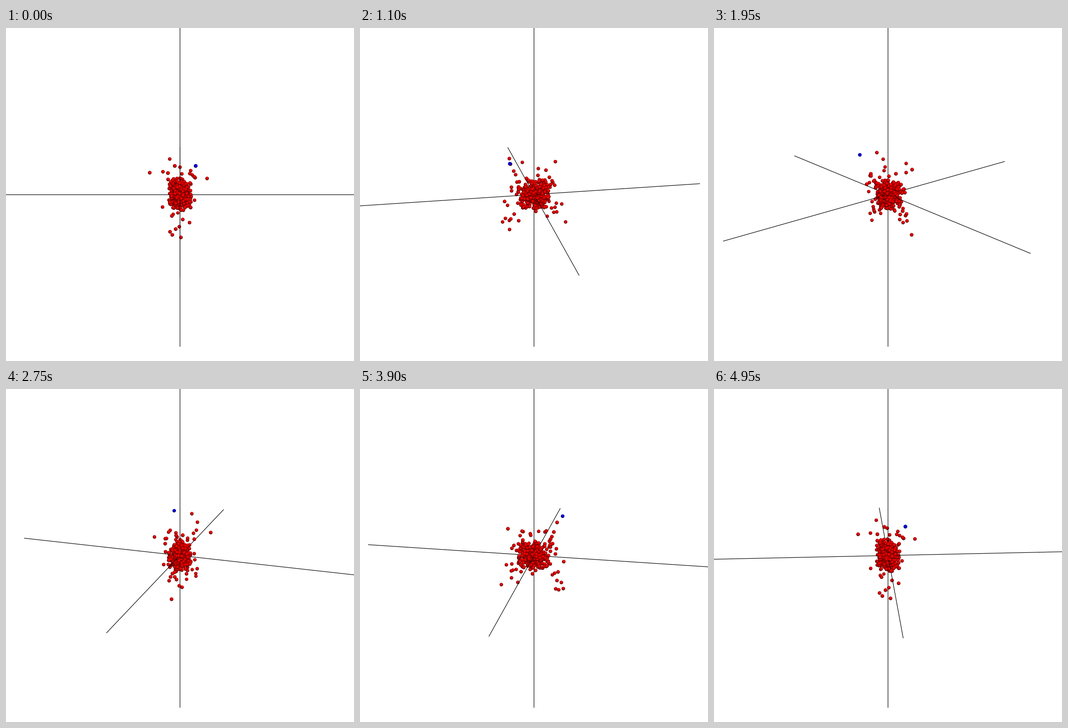
Write a matplotlib script that moves like this. It is 765 px wide and 732 px high and loops after 5 s.

```python
import numpy as np
import matplotlib.pyplot as plt
from matplotlib.animation import FuncAnimation
from matplotlib.collections import LineCollection

W, H, DPI = 765, 732, 100
FRAMES, INTERVAL = 100, 50
CX, CY = 382.5, 366
HALF = 390                     # half length of each axis
DIST = 3.5 * HALF              # camera distance
TILT = np.radians(20)
RADIUS = 3.9
CORE = 380                     # spheres in the dense middle

BLUE = (32.4, 57.5, 83.7)
# Outlying spheres as (right, toward viewer, up) at the start of the turn
OUTER = [
    (-23, -52.5, 65.5), (-10.8, 52, 82), (0, -26.5, 54.5), (-65, 14.5, 55),
    (-37.5, -17, 47), (-25.2, 47.5, 65), (4, -8, 45), (23.7, -29, 45.7),
    (21.8, -35.5, 36.7), (26.5, -13.5, 41), (30, 22, 48.5), (32.5, 18.5, 45),
    (59, -0.5, 37), (32.5, -16, -19.4), (-38.5, 4, -28), (-17.3, 56.5, -28),
    (-15.5, -33.5, -60.2), (5.9, 45.5, -40.7), (20.7, 38, -51),
    (-1.5, 52, -54.7), (-9.2, 63, -55.6), (-21.5, 52.5, -66.4),
    (-16.4, 68.5, -66.6), (2, 55.7, -78.3), (-5.1, -73.9, -73),
    (2.6, 65.8, -10.8), (0.6, -62.9, -26.6), (0.7, -50.4, -23.8),
    (-8.3, -49.7, -36.8), (-13.9, -48.2, -51.1), (8.4, -49.9, -41.5),
    (-1.2, -40.1, -35.3), (-7.2, -48, 16), (-6.6, -43.6, 22.7),
    (-1.6, 49.7, 19.6), (-7.1, 48.6, 9.3), (21.3, 36, 39),
    (-25.1, 40.5, 48.5), (-19.4, 37.3, 41.8), (11.5, 36, 24),
]


def core_points(count):
    rng = np.random.default_rng(7)
    pts = rng.normal(0, (12, 19, 17), (4 * count, 3))
    inside = (np.abs(pts) < (25, 38, 33)).all(axis=1)
    return pts[inside][:count]


points = np.vstack([[BLUE], OUTER, core_points(CORE)])
hues = np.tile([1.0, 0, 0], (len(points), 1))
hues[0] = 0, 0, 1

# Each sphere is a stack of discs shrinking toward the light
DISCS = np.array([1, 0.88, 0.74, 0.58, 0.4])
SHADES = np.array([0.36, 0.56, 0.75, 0.9, 1])
LIGHT = np.array([0.3, -0.6])
SHIFTS = (1 - DISCS)[:, None] * LIGHT

# Depth slabs let spheres and axes hide each other
EDGES = np.linspace(-60, 60, 16)
EDGES[0], EDGES[-1] = -np.inf, np.inf


def project(pts, angle):
    """Turn about the upright axis; return screen xy, depth and scale."""
    x, near, up = np.asarray(pts, float).T
    c, s = np.cos(angle), np.sin(angle)
    x, near = x * c - near * s, x * s + near * c
    depth = near * np.cos(TILT) + up * np.sin(TILT)
    scale = DIST / (DIST - depth)
    drop = near * np.sin(TILT) - up * np.cos(TILT)
    return np.column_stack([CX + x * scale, CY + drop * scale]), depth, scale


def axis_pieces(lo, hi, angle):
    """Parts of the three axes whose depth lies between lo and hi."""
    pieces = []
    for unit in np.eye(3):
        slope = project([unit], angle)[1][0]
        if abs(slope) < 1e-9:
            slope = 1e-9
        a, b = sorted((lo / slope, hi / slope))
        a, b = max(a - 0.5, -HALF), min(b + 0.5, HALF)
        if a < b:
            pieces.append(project([unit * a, unit * b], angle)[0])
    return pieces


fig = plt.figure(figsize=(W / DPI, H / DPI), dpi=DPI, facecolor="white")
ax = fig.add_axes([0, 0, 1, 1])
ax.set(xlim=(0, W), ylim=(H, 0))
ax.axis("off")

slabs = []
for i, (lo, hi) in enumerate(zip(EDGES[:-1], EDGES[1:])):
    lines = LineCollection([], colors="black", linewidths=1.2 * 72 / DPI,
                           zorder=2 * i)
    ax.add_collection(lines, autolim=False)
    balls = ax.scatter([], [], linewidths=0, zorder=2 * i + 1)
    slabs.append((lo, hi, lines, balls))
ax.set(xlim=(0, W), ylim=(H, 0))


def draw(n):
    angle = 2 * np.pi * n / FRAMES
    xy, depth, scale = project(points, angle)
    order = np.argsort(depth)
    for lo, hi, lines, balls in slabs:
        lines.set_segments(axis_pieces(lo, hi, angle))
        pick = order[(depth[order] >= lo) & (depth[order] < hi)]
        r = RADIUS * scale[pick]
        spots = xy[pick][:, None] + r[:, None, None] * SHIFTS
        sizes = (2 * r[:, None] * DISCS * 72 / DPI) ** 2
        colors = hues[pick][:, None] * SHADES[:, None]
        balls.set_offsets(spots.reshape(-1, 2))
        balls.set_sizes(sizes.ravel(), DPI)
        balls.set_facecolors(colors.reshape(-1, 3))
    return [artist for slab in slabs for artist in slab[2:]]


anim = FuncAnimation(fig, draw, frames=FRAMES, interval=INTERVAL,
                     repeat=True, repeat_delay=0)
plt.show()
```
